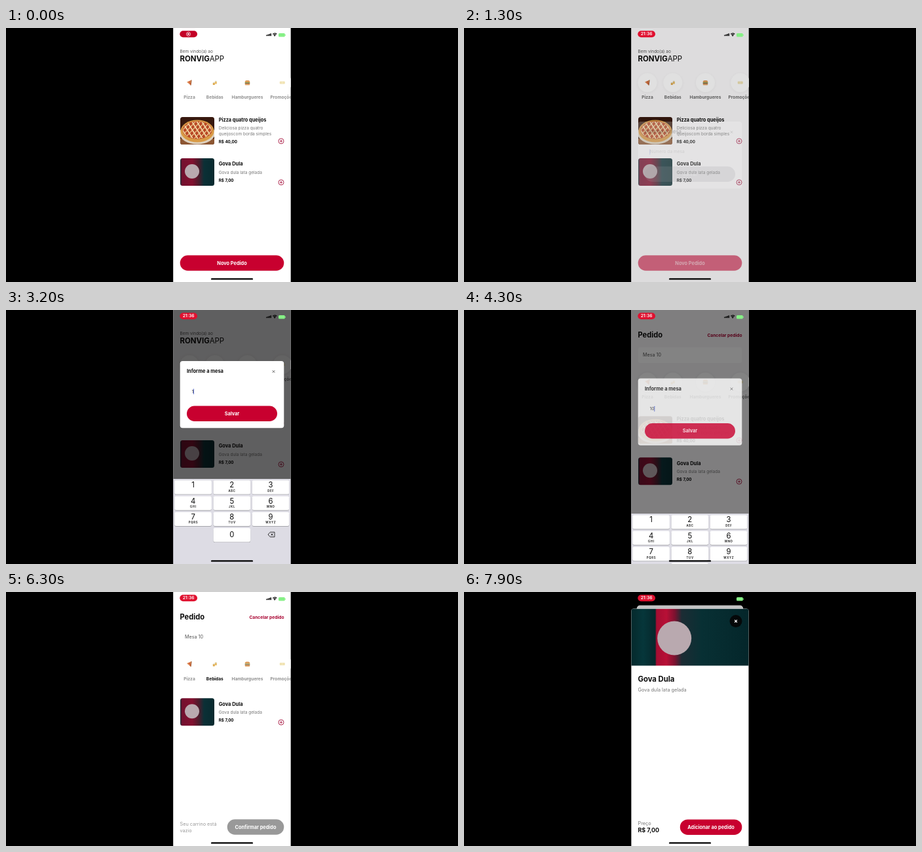
Write an HTML page with a canvas that moves like this. It is 690 px wide and 388 px high and loops after 8 s.

```html
<!DOCTYPE html>
<html lang="pt-BR">
<head>
<meta charset="utf-8">
<title>Pedido</title>
<style>
html, body { margin: 0; width: 100%; height: 100%; overflow: hidden; background: #000; }
canvas { display: block; width: 100%; height: 100%; }
</style>
</head>
<body>
<canvas id="stage"></canvas>
<script>
const W = 690, H = 388, LOOP = 8000, STEP = 100;
const LEFT = 255.2, WIDTH = 179.5;
const RED = '#c8002f', INK = '#0c0c0c', GREY = '#777';
const canvas = document.getElementById('stage');
const ctx = canvas.getContext('2d');
const ratio = window.devicePixelRatio || 1;
canvas.width = W * ratio;
canvas.height = H * ratio;

const clamp = v => Math.max(0, Math.min(1, v));
const ramp = (t, from, to) => clamp((t - from) / (to - from));
const within = (t, from, to) => t >= from && t < to;

// Critically damped spring from 0 to 1.
function spring(ms, rate) {
  const x = Math.max(0, ms) / 1000 * rate;
  return 1 - (1 + x) * Math.exp(-x);
}

function group(fn, alpha = 1) {
  ctx.save();
  ctx.globalAlpha *= alpha;
  fn();
  ctx.restore();
}

function box(x, y, w, h, r, fill) {
  ctx.beginPath();
  ctx.roundRect(x, y, w, h, r);
  if (fill) { ctx.fillStyle = fill; ctx.fill(); }
}

function disc(x, y, rx, fill, ry = rx) {
  ctx.beginPath();
  ctx.ellipse(x, y, rx, ry, 0, 0, Math.PI * 2);
  ctx.fillStyle = fill;
  ctx.fill();
}

function line(color, width, ...points) {
  ctx.strokeStyle = color;
  ctx.lineWidth = width;
  ctx.beginPath();
  points.forEach(([x, y], i) => i ? ctx.lineTo(x, y) : ctx.moveTo(x, y));
  ctx.stroke();
}

function text(str, x, y, size, { weight = 400, color = INK, align = 'left', gap = 0 } = {}) {
  ctx.font = `${weight} ${size}px Inter, sans-serif`;
  ctx.letterSpacing = gap + 'px';
  ctx.textAlign = align;
  ctx.textBaseline = 'middle';
  ctx.fillStyle = color;
  ctx.fillText(str, x, y);
  return ctx.measureText(str).width;
}

const bold = (str, x, y, size, color = INK, align = 'left') =>
  text(str, x, y, size, { weight: 700, color, align });

function button(label, x, y, w, fill) {
  box(x, y, w, 23.5, 11.75, fill);
  bold(label, x + w / 2, y + 12, 7.35, '#fff', 'center');
}

function cross(x, y, r, color, width = 0.9) {
  line(color, width, [x - r, y - r], [x + r, y + r]);
  line(color, width, [x + r, y - r], [x - r, y + r]);
}

function pizzaPhoto(x, y) {
  group(() => {
    box(x, y, 52, 42, 3.5, '#38190f');
    ctx.clip();
    box(x, y + 33, 52, 9, 0, '#8d5632');
    disc(x + 26, y + 25, 27, '#ddd0bd', 16.5);
    disc(x + 26, y + 21.5, 25.5, '#d99a45', 17);
    disc(x + 26, y + 20, 22.5, '#b84725', 13.5);
    ctx.beginPath();
    ctx.ellipse(x + 26, y + 20, 22, 13, 0, 0, Math.PI * 2);
    ctx.clip();
    for (let d = -30; d <= 30; d += 7.5) {
      line('#f0d6a6', 1.8, [x + 16 + d, y + 4], [x + 36 + d, y + 36]);
      line('#efc98d', 1.3, [x + 41 + d, y + 4], [x + 11 + d, y + 36]);
    }
  });
}

function canPhoto(x, y, w, h, r, stops, mark) {
  group(() => {
    const grad = ctx.createLinearGradient(x, 0, x + w, 0);
    stops.forEach(([at, color]) => grad.addColorStop(at, color));
    box(x, y, w, h, r, grad);
    ctx.clip();
    disc(x + mark[0], y + mark[1], mark[2], '#b9a9af');
  });
}

const thumbStops = [[0, '#16323a'], [0.05, '#72112f'], [0.35, '#82102f'], [0.55, '#4a1c2c'], [0.7, '#0b3036'], [1, '#092a2f']];
const coverStops = [[0, '#05292c'], [0.1, '#06363a'], [0.205, '#06282c'], [0.215, '#a50d32'], [0.3, '#b81036'], [0.37, '#7d1230'], [0.43, '#1c2c34'], [0.6, '#083034'], [1, '#04262a']];

function addIcon(x, y) {
  ctx.strokeStyle = '#a81640';
  ctx.lineWidth = 0.9;
  ctx.beginPath();
  ctx.arc(x, y, 4, 0, Math.PI * 2);
  ctx.stroke();
  line('#a81640', 0.9, [x - 2, y], [x + 2, y]);
  line('#a81640', 0.9, [x, y - 2], [x, y + 2]);
}

function pizzaItem(y) {
  pizzaPhoto(266, y);
  bold('Pizza quatro queijos', 324.7, y + 4.5, 7.35);
  text('Deliciosa pizza quatro', 324.7, y + 17.3, 6.5, { color: GREY });
  text('queijoscom borda simples', 324.7, y + 25.8, 6.5, { color: GREY });
  bold('R$ 40,00', 324.7, y + 38, 6.25);
  addIcon(420, y + 36.8);
}

function drinkItem(y) {
  canPhoto(266, y, 52, 42, 3.5, thumbStops, [18, 20, 11]);
  bold('Gova Dula', 324.7, y + 9, 7.45);
  text('Gova dula lata gelada', 324.7, y + 21.6, 6.5, { color: GREY });
  bold('R$ 7,00', 324.7, y + 34, 6.25);
  addIcon(420, y + 36.8);
}

const icons = [
  (x, y) => {
    ctx.beginPath();
    ctx.moveTo(x - 4, y - 1);
    ctx.lineTo(x + 3, y - 4);
    ctx.lineTo(x + 2, y + 4);
    ctx.fillStyle = '#d77836';
    ctx.fill();
    line('#9a5028', 1.2, [x + 3, y - 4], [x + 2, y + 4]);
    disc(x, y - 1, 1, '#c33a27');
    disc(x + 1, y + 1.4, 0.8, '#c33a27');
  },
  (x, y) => {
    box(x - 3, y, 3, 3.5, 0.6, '#d99a2c');
    box(x, y - 2, 3, 4, 0.6, '#e3b04a');
    disc(x + 1.5, y - 2.2, 1.5, '#d7dacb', 0.8);
    disc(x - 1.5, y, 1.5, '#d7dacb', 0.8);
  },
  (x, y) => {
    box(x - 3.8, y - 3.5, 7.6, 3, [3, 3, 0.5, 0.5], '#d78a3c');
    box(x - 3.8, y - 0.5, 7.6, 1, 0, '#6f9a3d');
    box(x - 3.8, y + 0.5, 7.6, 1.3, 0, '#76401f');
    box(x - 3.8, y + 1.8, 7.6, 1.9, 0.9, '#d78a3c');
  },
  (x, y) => {
    box(x - 4, y - 2, 8, 4, 1, '#e9d58d');
    line('#fff6d5', 0.8, [x, y - 1.5], [x, y + 1.5]);
  }
];

const categories = [['Pizza', 280], ['Bebidas', 318.8], ['Hamburgueres', 368.5], ['Promoções', 421.8]];

function categoryRow(y, dim, selected, pressed) {
  categories.forEach(([name, x], i) => {
    group(() => {
      group(() => {
        ctx.shadowColor = `rgba(0,0,0,${0.1 * dim})`;
        ctx.shadowBlur = 5 * ratio;
        ctx.shadowOffsetY = ratio;
        disc(x, y, 14.5, '#fff');
      });
      group(() => icons[i](x, y), i === 3 ? 0.65 : 0.85);
      const color = selected && i === 1 ? INK : dim > 0.3 ? '#686868' : '#8f8f8f';
      bold(name, x, y + 22.8, 6.6, color, 'center');
    }, pressed && i === 1 ? 0.3 : 1);
  });
}

function homePage(dim, buttonAlpha) {
  text('Bem vindo(a) ao', 265.5, 36, 6.5, { color: '#555' });
  const w = text('RONVIG', 265.5, 47.8, 11.4, { weight: 700 });
  text('APP', 265.5 + w, 47.8, 11.4);
  categoryRow(83.5, dim);
  pizzaItem(136);
  drinkItem(199);
  group(() => button('Novo Pedido', 265.7, 347.3, 158.6, RED), buttonAlpha);
}

function orderPage(t, dim) {
  bold('Pedido', 265.5, 39, 11.1);
  bold('Cancelar pedido', 424.5, 39, 6.65, '#a8002f', 'right');
  box(266, 57, 158, 24, 3, '#fff');
  text('Mesa 10', 273, 69, 7.2, { color: '#555' });
  const chosen = t >= 5900;
  categoryRow(110, dim, chosen, within(t, 5800, 5900));
  if (!chosen) {
    pizzaItem(162.3);
    drinkItem(225.3);
  } else if (t >= 6200) {
    const press = within(t, 7100, 7500) ? 0.2 + 0.8 * ramp(t, 7100, 7500) ** 1.2 : 1;
    group(() => drinkItem(162.3), press);
  }
  text('Seu carrino está', 265.5, 355, 7.25, { color: '#999' });
  text('vazio', 265.5, 364.7, 7.25, { color: '#999' });
  button('Confirmar pedido', 337.7, 347.3, 86.6, '#999');
}

function tableModal(t, alpha, lift) {
  const y = 143 - 65 * lift;
  const value = t >= 3600 ? '10' : t >= 3200 ? '1' : '';
  group(() => {
    box(265.7, y, 158.6, 102.3, 4, '#fff');
    bold('Informe a mesa', 276, y + 16, 7.45);
    cross(408.5, y + 16, 1.8, '#555');
    const w = value ? text(value, 283.5, y + 46.5, 6.8, { color: '#333' }) : 0;
    if (!value) text('Número da mesa', 283.7, y + 46.5, 6.6, { color: '#777' });
    box(283.3 + w, y + 42.3, 0.9, 8.4, 0.4, '#4257c9');
    group(() => button('Salvar', 276, y + 68.5, 138, value ? RED : '#9d9b9e'),
      within(t, 4000, 4200) ? 0.3 : 1);
  }, alpha);
}

const keys = ['1', '2 ABC', '3 DEF', '4 GHI', '5 JKL', '6 MNO', '7 PQRS', '8 TUV', '9 WXYZ', '', '0'];

function keyboard(top, active) {
  box(LEFT, top, WIDTH, 140, 0, '#dddce4');
  keys.forEach((key, i) => {
    if (!key) return;
    const [digit, letters] = key.split(' ');
    const x = 257.3 + (i % 3) * 59.2, y = top + 2.2 + Math.floor(i / 3) * 24.3;
    box(x, y + 0.6, 56.6, 21.3, 2.3, '#95959b');
    box(x, y, 56.6, 21.3, 2.3, digit === active ? '#c5c8d0' : '#fff');
    text(digit, x + 28.3, y + (digit === '0' ? 10.8 : 7.8), 11.3, { align: 'center' });
    if (letters) text(letters, x + 28.6, y + 16.4, 4.3, { weight: 600, align: 'center', gap: 0.7 });
  });
  const y = top + 85;
  line('#222', 0.9, [400, y], [403.3, y - 3.7], [410, y - 3.7], [410, y + 3.7], [403.3, y + 3.7], [400, y]);
  cross(406, y, 1.6, '#222');
}

const COVER = 86.8;

function productSheet(top) {
  group(() => {
    box(LEFT, top, WIDTH, H - top + 10, [4, 4, 0, 0], '#fff');
    ctx.clip();
    canPhoto(LEFT, top, WIDTH, COVER, 0, coverStops, [66, 45, 26]);
    disc(415, top + 19, 9.5, '#050809');
    cross(415, top + 19, 1.9, '#fff', 1.2);
    bold('Gova Dula', 265.5, top + 108, 11.3);
    text('Gova dula lata gelada', 265.5, top + 123.8, 7.3, { color: GREY });
    text('Preço', 265.5, top + 328.3, 7.3, { color: GREY });
    bold('R$ 7,00', 265.5, top + 339, 8.9);
    button('Adicionar ao pedido', 329.8, top + 321.8, 94.5, RED);
  });
}

function statusBar(t) {
  const clock = ramp(t, 0, 400);
  box(265.3, 4.3, 26.7, 10, 5, clock < 0.3 ? '#c30026' : '#e0102f');
  group(() => {
    ctx.strokeStyle = '#fff';
    ctx.lineWidth = 0.8;
    ctx.beginPath();
    ctx.arc(278.5, 9.3, 3, 0, Math.PI * 2);
    ctx.stroke();
    disc(278.5, 9.3, 1.3, '#fff');
  }, 1 - clock);
  group(() => text('21:36', 278.6, 9.4, 6.8, { weight: 600, color: '#fff', align: 'center' }), clock);

  for (let i = 0; i < 4; i++) box(397.2 + i * 2.1, 10.4 - i * 0.75, 1.5, 1.8 + i * 0.75, 0.4, '#000');
  ctx.strokeStyle = '#000';
  ctx.lineWidth = 1.1;
  for (const r of [2.4, 4.2]) {
    ctx.beginPath();
    ctx.arc(410.2, 12.3, r, -Math.PI * 0.76, -Math.PI * 0.24);
    ctx.stroke();
  }
  disc(410.2, 11.7, 0.9, '#000');
  box(416, 8, 9.8, 5.6, 1.5, '#86f086');
  box(426, 9.8, 0.8, 2, 0.3, '#86f086');
}

function draw(t) {
  ctx.setTransform(canvas.width / W, 0, 0, canvas.height / H, 0, 0);
  ctx.fillStyle = '#000';
  ctx.fillRect(0, 0, W, H);

  const modal = ramp(t, 1200, 1700) * (1 - ramp(t, 4200, 4700));
  const lift = t < 4200 ? spring(t - 2150, 19) : 1 - spring(t - 4200, 14);
  const sheet = spring(t - 7150, 14.2);
  const shade = Math.max(modal * 0.61, clamp(sheet * 6.5) * 0.21);
  const dim = clamp(shade * 4);
  const scale = 1 - 0.095 * sheet;

  group(() => {
    ctx.translate(345, 20.6 * sheet);
    ctx.scale(scale, scale);
    ctx.translate(-345, 0);
    const tone = 255 - 9 * dim;
    box(LEFT, 0, WIDTH, H + 50, sheet > 0 ? 13 - 8 * sheet : 0, `rgb(${tone},${tone - dim},${tone + dim})`);
    ctx.clip();
    if (t < 4200) {
      const press = within(t, 1100, 1500) ? 0.13 + 0.87 * ramp(t, 1100, 1500) : 1;
      homePage(dim, press);
    } else {
      orderPage(t, dim);
    }
    ctx.fillStyle = `rgba(0,0,0,${shade})`;
    ctx.fillRect(LEFT, 0, WIDTH, H + 50);
  });

  group(() => {
    ctx.beginPath();
    ctx.rect(LEFT, 0, WIDTH, H);
    ctx.clip();
    if (modal > 0) tableModal(t, modal, lift);
    if (lift > 0.002) {
      const active = within(t, 3100, 3200) ? '1' : within(t, 3500, 3600) ? '0' : '';
      keyboard(H - 130 * lift, active);
    }
    const top = H - 362.5 * sheet;
    if (sheet > 0) productSheet(top);
    statusBar(t);
    const overPhoto = top < 383 && top + COVER > 383;
    box(313, 382.2, 64, 2.4, 1.2, overPhoto ? '#5f6a6b' : '#000');
  });
}

function frame(now) {
  draw(Math.floor((now % LOOP) / STEP) * STEP);
  requestAnimationFrame(frame);
}
requestAnimationFrame(frame);
</script>
</body>
</html>
```
